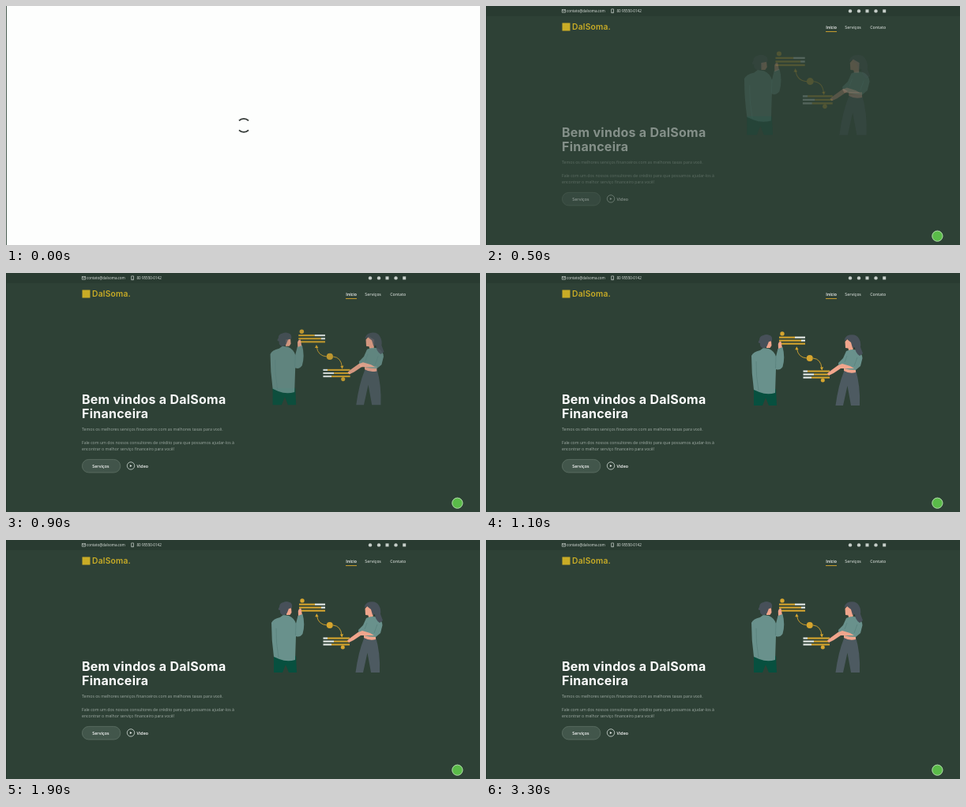
Write an HTML page with a canvas that moves like this. It is 600x303 px and loops after 3.4 s.

```html
<!DOCTYPE html>
<html lang="pt">
<head>
<meta charset="utf-8">
<title>DalSoma Financeira</title>
<style>
  html, body { margin: 0; width: 100%; height: 100%; overflow: hidden; background: #2e4136; }
  canvas { display: block; width: 600px; height: 303px; }
</style>
</head>
<body>
<canvas id="stage"></canvas>
<script>
const W = 600, H = 303, LOOP = 3400, STEP = 100;
const canvas = document.getElementById('stage');
const ctx = canvas.getContext('2d');
const dpr = window.devicePixelRatio || 1;
canvas.width = W * dpr;
canvas.height = H * dpr;

const BG = '#2e4136', GOLD = '#d6a52e', BRAND = '#c9ac26', PALE = '#e3e8e4';
const TEAL = '#69918c', FOLD = '#557c78', PINE = '#07503f', SLATE = '#4d5a61', HAIR = '#475059', SKIN = '#f0a58c';
const SANS = '"Open Sans", "Noto Sans", sans-serif';
const HEAD = 'Inter, "Open Sans", sans-serif';

const progress = (t, start, length) => Math.min(1, Math.max(0, (t - start) / length));
const smooth = p => p * p * (3 - 2 * p);

function rect(x, y, w, h, color) {
  ctx.fillStyle = color;
  ctx.fillRect(x, y, w, h);
}

function dot(x, y, r, color) {
  ctx.fillStyle = color;
  ctx.beginPath();
  ctx.arc(x, y, r, 0, Math.PI * 2);
  ctx.fill();
}

function ring(x, y, r, color, width) {
  ctx.strokeStyle = color;
  ctx.lineWidth = width;
  ctx.beginPath();
  ctx.arc(x, y, r, 0, Math.PI * 2);
  ctx.stroke();
}

function shape(d, color) {
  ctx.fillStyle = color;
  ctx.fill(new Path2D(d));
}

function line(d, color, width) {
  ctx.strokeStyle = color;
  ctx.lineWidth = width;
  ctx.stroke(new Path2D(d));
}

function label(str, x, y, font, color, spacing = 0) {
  ctx.font = font;
  ctx.letterSpacing = spacing + 'px';
  ctx.fillStyle = color;
  ctx.fillText(str, x, y);
}

function loader(t) {
  rect(0, 0, W, H, '#fdfefd');
  rect(0, 0, 1, H, '#4a5c52');
  const turn = t / 1500 * Math.PI * 2;
  ctx.strokeStyle = '#343a37';
  ctx.lineWidth = 1.9;
  for (const side of [0.25, 1.25]) {
    ctx.beginPath();
    ctx.arc(301, 151.4, 8.5, turn + side * Math.PI, turn + (side + 0.5) * Math.PI);
    ctx.stroke();
  }
}

function header(t) {
  rect(0, 0, W, 13, '#293b31');
  rect(0, 0, 1, H, '#26362d');

  line('M96.3 4.6h4.2v3.6h-4.2zl2.1 2 2.1-2', PALE, 0.6);
  label('contato@dalsoma.com', 102, 8.1, '4.55px ' + SANS, PALE);
  line('M158.7 3.9h2.8v4.8h-2.8zM159.6 7.9h1', PALE, 0.6);
  label('80 95550-0142', 165.5, 8.1, '4.55px ' + SANS, PALE);

  const icon = '#c6cec9';
  for (const x of [461, 472, 493.5]) dot(x, 6.4, 2.2, icon);
  for (const x of [482.5, 504.2]) rect(x - 2, 4.4, 4, 4, icon);

  rect(96.5, 21.5, 10, 10, BRAND);
  label('DalSoma.', 109, 30.4, '600 10.3px ' + HEAD, BRAND, 0.2);

  const nav = '600 5.2px ' + SANS;
  label('Início', 430.3, 28.6, nav, '#fff');
  label('Serviços', 454.3, 28.6, nav, '#c3cbc6');
  label('Contato', 486.2, 28.6, nav, '#c3cbc6');
  rect(430, 32, 1 + 13 * smooth(progress(t, 100, 300)), 0.9, GOLD);
}

function copy(alpha) {
  ctx.globalAlpha = alpha;
  const title = '700 16px ' + HEAD;
  label('Bem vindos a DalSoma', 96, 166, title, '#fff', 0.25);
  label('Financeira', 96, 184.2, title, '#fff', 0.25);

  const text = '5.2px ' + SANS, gray = '#a1ada6';
  label('Temos os melhores serviços financeiros com as melhores taxas para você.', 96, 199.9, text, gray);
  label('Fale com um dos nossos consultores de crédito para que possamos ajudar-los à', 96, 217, text, gray);
  label('encontrar o melhor serviço financeiro para você!', 96, 224.7, text, gray);

  ctx.beginPath();
  ctx.roundRect(96.4, 236.4, 48.4, 16.6, 8.3);
  ctx.fillStyle = '#42564b';
  ctx.fill();
  ctx.strokeStyle = '#65776c';
  ctx.lineWidth = 0.7;
  ctx.stroke();
  label('Serviços', 109.3, 246.5, '600 5.2px ' + SANS, '#fff', 0.1);

  ring(158, 244.4, 4.7, '#d5ddd8', 0.8);
  shape('M156.9 242.9l2.7 1.5-2.7 1.5z', '#e8edea');
  label('Video', 165.6, 246.5, '600 5.3px ' + SANS, '#fff');
  ctx.globalAlpha = 1;
}

// Each row: left part, split point, right part
function bars(x1, x2, y, rows) {
  rows.forEach(([left, split, right], i) => {
    rect(x1, y + i * 4, split - x1, 2.1, left);
    rect(split, y + i * 4, x2 - split, 2.1, right);
  });
}

function man() {
  shape('M339 147H367L368 168H358L354 158 350 168H339Z', PINE);
  shape('M370 97L369.8 90Q371 86 373.5 87L375 95Z', SKIN);
  shape('M336 105Q338 100 347 98L351 95 358 96Q365 99 367 106L369.5 96 375.5 94Q379 107 375.5 119Q372 124 367 122L366 152Q356 155 346 151L339 148Q336 127 336 105Z', TEAL);
  line('M342 112L342.5 130 345 149 M367 106L366.5 121', FOLD, 0.6);
  shape('M355 87L361 86 361.5 92 359.5 95 355 95Z', SKIN);
  shape('M346 85Q346 80 351 79Q355 77 359 79Q363 80 362 86L358 87 356 92Q354 96 350 95Q346 93 347 89Q343 89 346 85Z', HAIR);
}

function woman() {
  shape('M454 123H468Q474 143 473 168H462L457.5 143 452 168H442.5Q446 142 453 125Z', SLATE);
  shape('M453 120H468V126Q460 128 453 124Z', SKIN);
  shape('M454.5 87L458 83 465 87 464.5 98H459L458.5 95.5 455 95Z', SKIN);
  shape('M432 127.5L436 124 447 116 452 119 440 127 434 130Z', SKIN);
  shape('M456 99Q463 95.5 470 98Q476 101 476.5 108L474 118 468 123Q460 123 453 121L446.5 118 446 114 452 108Z', TEAL);
  shape('M446 117L451 115 461 118 466 121 454 121 448 121Z', SKIN);
  line('M457 105L454 113 M470 107L466 118', FOLD, 0.6);
  shape('M453.5 86Q454 80 460 78.5Q469 77 472 83Q475 88 474 94L477 102 473 105Q467 101 467 94L464 95 462 88 457 84Z', HAIR);
}

function art(p) {
  const s = 1.2 - 0.2 * p;
  ctx.save();
  ctx.globalAlpha = p ** 1.5;
  ctx.translate(406, 203);
  ctx.scale(s, s);
  ctx.translate(-406, -203);

  const w = '#e8edea';
  dot(375, 76.9, 2.7, GOLD);
  bars(371, 404, 80.6, [[GOLD, 391, w], [GOLD, 399, w], [GOLD, 404, w]]);
  man();
  bars(401.5, 435, 123.5, [[w, 407, GOLD], [w, 415, GOLD], [w, 412, GOLD]]);
  dot(426.3, 136, 2.5, GOLD);
  woman();

  line('M393.5 96Q395 107 406 108 M414 108Q424 109 425 121', GOLD, 0.9);
  shape('M393.2 93.2L391.3 97.2H395.6Z M425.3 123.4L422.9 119.8L427 119.3Z', GOLD);
  dot(409.8, 107.9, 4, GOLD);
  ctx.restore();
}

function draw(t) {
  ctx.setTransform(dpr, 0, 0, dpr, 0, 0);
  ctx.globalAlpha = 1;
  if (t < 100) return loader(t);
  rect(0, 0, W, H, BG);
  header(t);
  copy(smooth(progress(t, 100, 900)));
  art(smooth(progress(t, 100, 1000)));
  dot(571.4, 291.7, 6.9, '#5abb49');
  ring(571.4, 291.7, 6.6, '#b9d8b5', 0.9);
}

const begin = performance.now();
function tick() {
  const t = (performance.now() - begin) % LOOP;
  draw(Math.floor(t / STEP) * STEP);
  requestAnimationFrame(tick);
}
tick();
</script>
</body>
</html>
```
